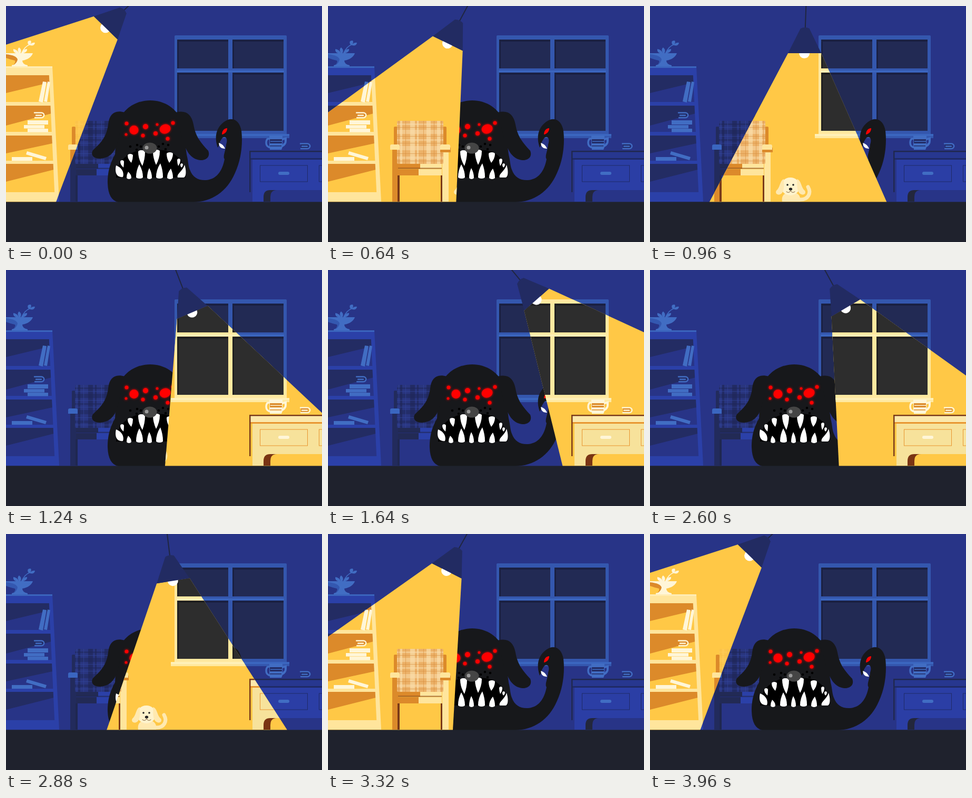
Recreate the animation shown at these times as an HTML page. Size 600 px wide and 450 px high, loop 4000 ms.

```html
<!DOCTYPE html>
<html lang="en">
<head>
<meta charset="utf-8">
<title>Swinging lamp</title>
<style>
html, body { margin: 0; width: 100%; height: 100%; overflow: hidden; background: #283487; }
svg { display: block; width: 600px; height: 450px; }
</style>
</head>
<body>
<svg id="stage" viewBox="0 0 600 450"></svg>
<script>
const dark = {
  wall: '#283487', frame: '#3457ae', bar: '#3b66bf', pane: '#222a54', paneShade: '#1a2042',
  shelf: '#2b40a8', shelfTop: '#3b65bd', shade: '#232c63', item: '#416dc3', itemLine: '#222c66', bowl: '#3458b0',
  post: '#222b5c', arm: '#3a66c0', seat: '#222a55', apron: '#2b40a8', leg: '#1f2750', farLeg: '#2b40a8',
  cushion: '#29357f', stripe: '#1f2757', thin: '#34489f',
  desk: '#2b3ea5', deskTop: '#27378f', deskLine: '#20284f', drawer: '#1f2a66', arch: '#23273c'
};
const lit = {
  wall: '#ffc846', frame: '#ffe9a0', bar: '#fff0b8', pane: '#2d2d2d', paneShade: '#1f1f1f',
  shelf: '#ffe59c', shelfTop: '#ffedb5', shade: '#dc8a2a', item: '#fff6d8', itemLine: '#dc8a2a', bowl: '#dc8a2a',
  post: '#dc8a2a', arm: '#ffe59c', seat: '#dc8a2a', apron: '#ffe59c', leg: '#7a3a18', farLeg: '#ffe59c',
  cushion: '#ecb168', stripe: '#fbe0ae', thin: '#d58a3d',
  desk: '#f7e29b', deskTop: '#fbe8ac', deskLine: '#7a3a18', drawer: '#e8952f', arch: '#7a3413'
};

const rect = (x, y, w, h, fill, more = '') =>
  `<rect x="${x}" y="${y}" width="${w}" height="${h}" fill="${fill}" ${more}/>`;
const path = (d, fill, more = '') => `<path d="${d}" fill="${fill}" ${more}/>`;
const line = (d, color, width) =>
  path(d, 'none', `stroke="${color}" stroke-width="${width}" stroke-linecap="round"`);
const oval = (x, y, rx, ry, fill, more = '') =>
  `<ellipse cx="${x}" cy="${y}" rx="${rx}" ry="${ry}" fill="${fill}" ${more}/>`;

function windowFrame(c) {
  let out = rect(320, 56, 213, 190, c.frame, 'rx="2"');
  for (const [y, h] of [[64, 55], [127, 111]])
    for (const x of [325, 430])
      out += rect(x, y, 97, h, c.paneShade) + rect(x + 3, y + 4, 94, h - 4, c.pane);
  return out + rect(324, 123, 204, 3.5, c.bar) + rect(313, 244, 225, 8, c.frame) + rect(313, 244, 225, 4, c.bar);
}

const smallMug = (x, y, c) => `<g transform="translate(${x} ${y})">` +
  rect(2, 1, 14, 11, c.itemLine) +
  line('M1 1.5H14C21 1.5 21 11 14 11H2M4 6.5H14', c.item, 2.4) + '</g>';

function bookshelf(c) {
  let out = '';
  const rows = [[132, 83, 146, 166], [190, 86, 205, 228], [247, 88, 262, 281], [301, 91, 312, 335]];
  for (const [y, x, right, left] of rows)
    out += path(`M0 ${y}H${x}V${right}L0 ${left}Z`, c.shade);
  out += rect(0, 115, 87, 17, c.shelf);
  for (const [y, w, h] of [[183, 88, 7], [240, 91, 7], [295, 94, 6], [355, 98, 18]])
    out += rect(0, y, w, h, c.shelf);
  out += path('M81 115H88L101 373H93Z', c.shelf) + rect(0, 115, 88, 3, c.shelfTop);
  out += path('M70 144L77 145L70 184L62 182ZM79 144L84 145L78 183L72 182Z', c.item);
  out += rect(41, 218, 39, 8, c.item) + rect(34, 227, 39, 6.5, c.item) + rect(41, 234, 39, 6.5, c.item);
  out += smallMug(53, 202, c);
  out += rect(11, 288, 39, 7, c.item) + path('M40 277L77 288L75 294L38 283Z', c.item);
  return out;
}

function plant(c) {
  return line('M30 90Q34 78 46 73', c.item, 1.5) +
    path('M42 73Q39 65 47 66Q49 70 46 73Q50 69 55 70Q54 77 46 75Z', c.item) +
    path('M25 91Q20 82 25 79Q31 84 27 91ZM23 91Q12 89 14 82Q22 83 25 91ZM28 91Q32 82 40 82Q41 89 28 91Z', c.item) +
    path('M0 90H51Q47 101 31 104Q31 111 41 113V115H11V113Q20 111 20 104Q8 102 0 98Z', c.item) +
    path('M0 92Q20 94 22 102Q21 109 13 113Q19 108 17 104Q8 102 0 99Z', c.bowl);
}

function cushion(c, id) {
  const tint = (x, y, w, h, o, fill = c.stripe) => rect(x, y, w, h, fill, `opacity="${o}"`);
  let out = rect(131, 219, 88, 82, c.cushion, 'rx="2"');
  for (const [x, w] of [[137, 4], [156, 9], [169, 3], [187, 8], [207, 6]]) out += tint(x, 219, w, 82, .65);
  for (const [y, h] of [[224, 3], [236, 8], [254, 3], [267, 8], [287, 5]]) out += tint(131, y, 88, h, .5);
  for (const x of [134, 147, 181, 201, 215]) out += tint(x, 219, 1, 82, .6, c.thin);
  for (const y of [231, 248, 261, 281, 295]) out += tint(131, y, 88, 1, .6, c.thin);
  return `<g id="${id}">${out}</g>`;
}

function chair(c, id) {
  return rect(125, 230, 7, 36, c.post, 'rx="2"') + rect(218, 230, 7, 36, c.post, 'rx="2"') +
    rect(132, 301, 84, 9, c.apron) + rect(132, 301, 43, 9, c.seat) +
    rect(132, 308.5, 84, 2, c.leg, 'opacity=".6"') +
    rect(132, 311, 84, 12, c.apron) + rect(132, 311, 40, 12, c.seat) +
    rect(122, 272, 11, 101, c.post) + rect(132, 323, 4, 50, c.leg) +
    rect(214, 323, 4, 50, c.leg) + rect(217, 272, 12, 101, c.farLeg) +
    cushion(c, id) +
    rect(118, 264, 18, 9, c.arm, 'rx="3"') + rect(118, 270, 18, 4, c.arm) +
    rect(213, 264, 19, 9, c.arm, 'rx="3"') + rect(213, 270, 20, 9, c.post) + rect(213, 270, 19, 4, c.arm);
}

function desk(c) {
  const drawer = x => rect(x, 304, 90, 31, 'none', `stroke="${c.drawer}"`);
  return rect(468, 291, 132, 82, c.desk) +
    path('M489 373V364Q489 351 502 351H600V373Z', c.arch) +
    path('M502 373V364Q502 351 515 351H600V373Z', c.wall) +
    rect(463, 277, 137, 15, c.deskTop) + rect(463, 290, 137, 3, c.drawer) +
    rect(462, 276, 138, 2.5, c.deskLine) + rect(462, 276, 2.5, 79, c.deskLine) +
    drawer(482.5) + drawer(594.5) + rect(517, 316, 21, 6, c.item, 'rx="3"');
}

function teapot(c) {
  return line('M502 253H498Q494 254 494 261Q494 269 503 270', c.item, 3.5) +
    path('M500 247H525V252L533 250V257Q533 265 525 269L523 274H501V268H500Z', c.item) +
    path('M525 256L529 255V260L525 264Z', c.wall) +
    rect(501, 254, 23, 8, c.itemLine) + rect(502, 257.5, 22, 1.5, c.item) +
    rect(501, 266, 22, 1.5, c.itemLine) + smallMug(558, 261, c);
}

const room = (c, id) => rect(0, 0, 600, 450, c.wall) + windowFrame(c) + plant(c) + bookshelf(c) +
  chair(c, id) + desk(c) + teapot(c);

function tooth([a, b, y, tipX, tipY]) {
  const bulge = y < tipY ? -4 : 4, mid = (y + tipY) / 2;
  return path(`M${a} ${y}C${a} ${y + bulge} ${b} ${y + bulge} ${b} ${y}Q${b} ${mid} ${tipX} ${tipY}Q${a} ${mid} ${a} ${y}`, '#fff');
}

function monster() {
  const skin = '#17181b';
  const teeth = [
    [217, 224, 297, 223, 308], [231, 241, 285, 238, 299], [251, 264, 278, 259, 305], [279, 292, 277, 285, 303],
    [305, 317, 282, 310, 299], [325, 331, 294, 327, 305], [331, 336, 303, 333, 308],
    [229, 238, 327, 232, 316], [247, 260, 326, 253, 302], [268, 277, 327, 272, 309],
    [285, 298, 326, 293, 300], [306, 317, 327, 313, 310]
  ];
  const eyes = [[229, 224, 3.5], [243, 236.5, 8.5], [265, 230, 5], [260, 247, 3.5], [228, 245, 2.5],
    [287, 226, 2.5], [284, 243, 4], [317, 223, 3.5], [307, 253, 3.5]];
  const freckles = [[249, 265], [236, 268], [256, 268], [248, 274], [298, 263], [290, 268], [303, 273], [308, 265]];
  return path(`M213 374Q194 370 193 338C193 312 199 298 207 283L212 225C230 165 318 165 335 225L343 283
      C346 295 346 305 349 312C354 327 366 333 380 332C404 330 412 308 415 292C411 287 417 277 418 264
      C423 249 413 246 409 254C404 261 405 266 402 270C395 250 399 232 414 221C430 209 444 219 447 238
      C450 264 446 294 435 318C420 354 390 374 355 374Z`, skin) +
    path('M226 203C206 197 196 206 194 226C191 250 180 261 165 275C160 284 166 291 178 291C199 290 209 276 213 255Z', skin) +
    path('M322 203C342 198 352 206 356 226C360 250 371 262 384 276C388 286 382 294 369 294C350 292 342 276 335 255Z', skin) +
    path('M209 327C209 302 224 285 244 278C260 272 296 272 311 278C330 286 341 304 341 327Z', '#000') +
    teeth.map(tooth).join('') +
    path('M209 304C220 308 225 318 222 326C210 328 206 317 209 304ZM339 303C343 314 342 327 337 327H326C323 320 336 315 339 303Z', '#fff') +
    freckles.map(([x, y]) => oval(x, y, 2.3, 2.3, '#000')).join('') +
    oval(273, 271, 13.5, 10.5, '#454545') + oval(267, 270, 3.5, 3.5, '#9a9a9a') +
    '<g style="filter:drop-shadow(0 0 2px #f00)">' +
    eyes.map(([x, y, r]) => oval(x, y, r, r, '#f00')).join('') +
    oval(302, 234.5, 10.5, 8.8, '#f00', 'transform="rotate(-15 302 234)"') + '</g>' +
    path('M410 245C410 238 414 233 420 233C420 239 416 244 410 245Z', '#f00') +
    path('M404 261Q412 263 416 272Q405 273 404 261Z', '#fff');
}

function puppy() {
  const fur = '#fff3cc', ear = '#ffe9b0';
  return line('M284 369C300 370 307 357 300 345', ear, 7) +
    path('M251 373C249 362 255 355 268 355C281 355 287 362 285 373Z', ear) +
    oval(266.5, 344, 18, 17, fur) +
    path('M254 330C246 333 248 345 240 352C236 359 246 363 251 356C256 349 254 340 254 330Z', ear) +
    path('M279 330C288 333 286 345 294 352C298 359 289 363 283 356C278 349 280 340 279 330Z', ear) +
    oval(261, 341, 1.8, 1.8, '#222') + oval(272, 341, 1.8, 1.8, '#222') + oval(267, 349, 3.2, 2.6, '#222') +
    line('M259 354Q264 358 267 352Q270 358 275 354', '#6b4a2a', .9);
}

document.getElementById('stage').innerHTML =
  '<defs><clipPath id="beam"><path id="cone" d="M-33 153.3L30 151L463 1051L-466 1053Z"/></clipPath></defs>' +
  room(dark, 'darkCushion') + monster() +
  `<g clip-path="url(#beam)">${room(lit, 'litCushion')}${puppy()}</g>` +
  rect(0, 373.5, 600, 77, '#1f222d') +
  '<g id="lamp">' + line('M-2 0V106', '#20263f', 2) + oval(-2, 152, 10, 10, '#fff') +
  path('M-11 105.5Q-3 101 5.7 104.5L30 151L-33 153.3Z', '#222b62') + '</g>';

const LOOP = 4000, TURN = 2015, LEFT = -46.4, RIGHT = 43.9;
const [cone, lamp, litCushion] = ['cone', 'lamp', 'litCushion'].map(id => document.getElementById(id));

// cubic-bezier(.48, 0, .47, 1)
function ease(u) {
  let low = 0, high = 1;
  for (let i = 0; i < 24; i++) {
    const s = (low + high) / 2, r = 1 - s;
    if (3 * r * r * s * .48 + 3 * r * s * s * .47 + s * s * s < u) low = s; else high = s;
  }
  return low * low * (3 - 2 * low);
}

function draw() {
  const t = performance.now() % LOOP;
  const swing = t < TURN ? ease(t / TURN) : 1 - ease((t - TURN) / (LOOP - TURN));
  const angle = LEFT + (RIGHT - LEFT) * swing;
  const pose = `translate(300.5 -62) rotate(${-angle})`;
  cone.setAttribute('transform', pose);
  lamp.setAttribute('transform', pose);
  // The cushion only catches light once the beam leaves its far left turn.
  litCushion.setAttribute('opacity', Math.min(1, .15 + (angle - LEFT) / 6));
  requestAnimationFrame(draw);
}
draw();
</script>
</body>
</html>
```
